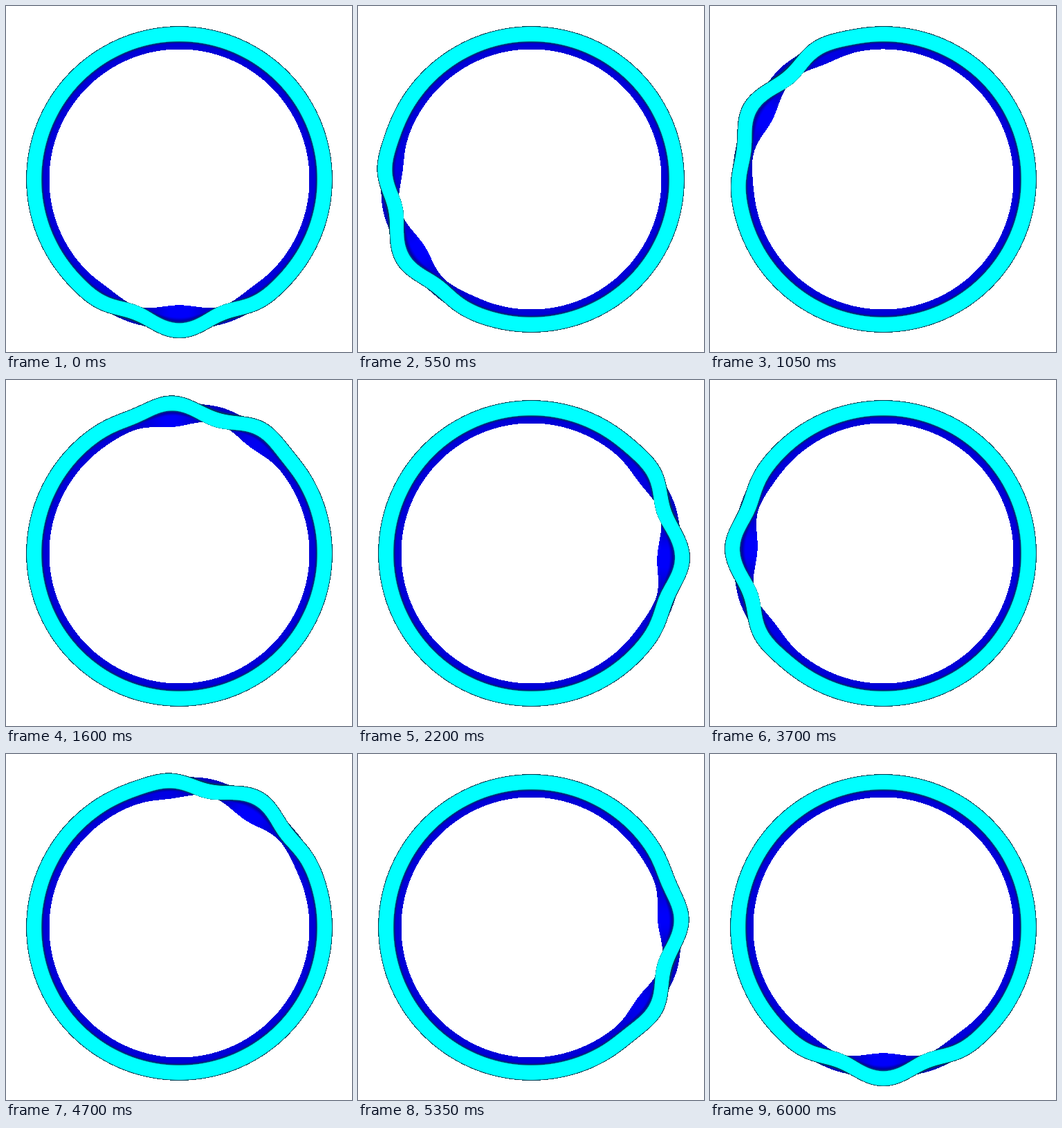
These frames come from a looping animation (500x500 px, 6.05 s). An HTML page with a canvas:

```html
<!DOCTYPE html>
<html lang="en">
<head>
<meta charset="utf-8">
<title>Wave on a ring</title>
<style>
html, body { margin: 0; width: 100%; height: 100%; overflow: hidden; background: #fff; }
canvas { display: block; width: 500px; height: 500px; }
</style>
</head>
<body>
<canvas id="stage" width="500" height="500"></canvas>
<script>
const SIZE = 500, CENTER = 250;
const STEP = 50, LOOP = 6050;
const FRONT_OUT = 221, FRONT_IN = 199;
const BACK_OUT = 208.8, BACK_IN = 188;

const ctx = document.getElementById('stage').getContext('2d');
const image = ctx.createImageData(SIZE, SIZE);
const px = image.data;

const clamp = v => Math.max(0, Math.min(1, v));
const mix = (a, b, k) => a + (b - a) * k;
const smooth = v => { v = clamp(v); return v * v * (3 - 2 * v); };

// Slices through the wall from front (z = 0) to back (z = 1);
// the shift reverses soon behind the front rim.
const slices = Array.from({ length: 11 }, (_, k) => {
  const z = k / 10;
  return {
    out: mix(FRONT_OUT, BACK_OUT, z),
    inn: mix(FRONT_IN, BACK_IN, z),
    gain: 1.8 * Math.exp(-z / 0.3) - 0.8
  };
});

// Polar coordinates of the pixels the ring can reach;
// angles run clockwise from the bottom, in degrees.
const cells = [];
for (let y = 0; y < SIZE; y++) {
  for (let x = 0; x < SIZE; x++) {
    const dx = x - CENTER, dy = y - CENTER, r = Math.hypot(dx, dy);
    if (r > 174 && r < 236) {
      cells.push({ i: (y * SIZE + x) * 4, r, a: Math.atan2(-dx, dy) / DEG() });
    }
  }
}

function DEG() { return Math.PI / 180; }

// Radial shift of the front rim: a packet going round with its carrier inside.
function shift(angle, n) {
  let d = (angle - 6 * n) % 360;
  if (d > 180) d -= 360;
  if (d < -180) d += 360;
  if (Math.abs(d) > 65) return 0;
  const envelope = Math.exp(-Math.pow(Math.abs(d) / 30, 3));
  return envelope * (9 * Math.cos((8.5 * d + 72 * n) * DEG()) - 0.6);
}

function put(i, r, g, b) {
  px[i] = r;
  px[i + 1] = g;
  px[i + 2] = b;
}

function paint(i, r, w) {
  const out = FRONT_OUT + w, inn = FRONT_IN + w;
  let wallOut = FRONT_OUT + w, wallIn = BACK_IN;
  if (w) {
    wallIn = inn;
    for (const s of slices) {
      wallOut = Math.max(wallOut, s.out + s.gain * w);
      wallIn = Math.min(wallIn, s.inn + s.gain * w);
    }
  }

  if (r <= out + 0.4 && r >= inn) {
    const edge = Math.max(clamp((r - out + 1) / 0.8), clamp(inn + 1 - r) * 0.7);
    put(i, 0, mix(255, 60, edge), mix(255, 80, edge));
  } else if (r > out && r < wallOut) {
    const lit = smooth((r - out) / 4);
    put(i, 0, mix(50, 0, lit), mix(110, 195, lit));
  } else if (r < inn && r >= wallIn) {
    const depth = inn - r, wall = inn - wallIn;
    const base = 215 + 36 * Math.max(-1, Math.min(1, (wall - 11) / 12));
    const lit = smooth(depth / Math.max(2.5, wall * 0.35));
    put(i, 0, mix(60, 0, clamp(depth / 2.5)), base * mix(0.55, 1, lit));
  } else {
    put(i, 255, 255, 255);
  }
}

function draw(n) {
  for (const c of cells) paint(c.i, c.r, shift(c.a, n));
  ctx.putImageData(image, 0, 0);
}

px.fill(255);
const start = performance.now();
let last = -1;

function tick() {
  const n = Math.floor(((performance.now() - start) % LOOP) / STEP);
  if (n !== last) draw(last = n);
  requestAnimationFrame(tick);
}
tick();
</script>
</body>
</html>
```
